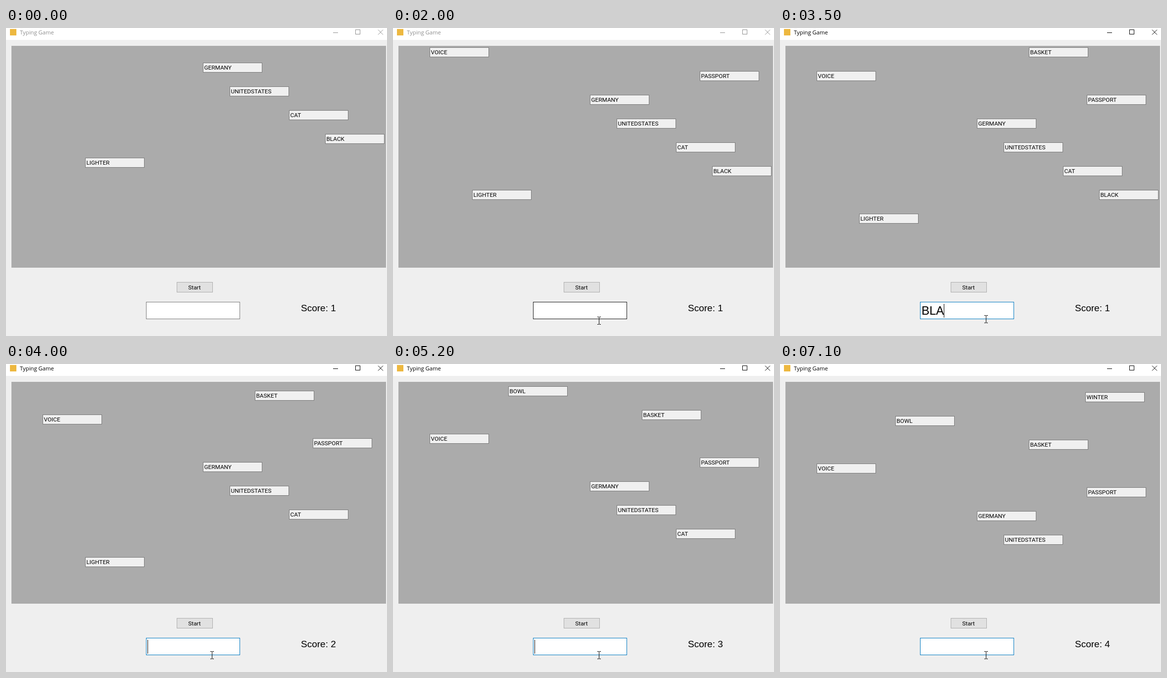
Recreate the animation shown at these times as an HTML page. Size 770 by 622 pixels, loop 7.2 s.

```html
<!DOCTYPE html>
<html lang="en">
<head>
<meta charset="utf-8">
<title>Typing Game</title>
<style>
  html, body { margin: 0; width: 100%; height: 100%; overflow: hidden; background: #efefef; }
  svg { display: block; }
  text { white-space: pre; fill: #000; }
  .label { font: 11.8px Roboto, sans-serif; }
  .title { font: 11.3px "Open Sans", sans-serif; }
  .score { font: 19px "Liberation Sans", Arial, sans-serif; }
  .typed { font: 24px "Liberation Sans", Arial, sans-serif; }
  .line { fill: none; shape-rendering: crispEdges; }
  #word rect { fill: #f0f0f0; stroke: #7a7a7a; }
</style>
</head>
<body>
<svg width="770" height="622" viewBox="0 0 770 622">
  <rect width="770" height="622" fill="#efefef"/>
  <rect width="770" height="24" fill="#fff"/>
  <rect x="8" y="2" width="13" height="13" fill="#edb83f"/>
  <text id="title" class="title" x="28" y="13">Typing Game</text>
  <g id="controls" fill="none">
    <path class="line" d="M661 9.5h10M706.5 3.5h9v9h-9z"/>
    <path d="M752 3.5l10 10M762 3.5l-10 10"/>
  </g>

  <clipPath id="clip"><rect x="11" y="36" width="757" height="448"/></clipPath>
  <rect x="11" y="36" width="757" height="448" fill="#ababab"/>
  <g id="words" clip-path="url(#clip)"></g>

  <rect x="345.5" y="513.5" width="72" height="20" fill="#e1e1e1" stroke="#adadad"/>
  <text class="label" x="381" y="528" text-anchor="middle">Start</text>
  <rect id="box" x="283.5" y="553.5" width="189" height="34" fill="#fff"/>
  <text id="typed" class="typed" x="286" y="579"></text>
  <rect id="caret" y="557" width="1" height="28"/>
  <text id="score" class="score" x="596" y="572"></text>
  <path id="cursor" class="line" stroke="#000" d="M-3 -7.5h3M1 -7.5h3M.5 -7v14M-3 7.5h3M1 7.5h3"/>
</svg>
<script>
const LOOP = 7200, TICK = 100, TOP = 36, GAP = 48, STEP = 3, FOCUS = 2300, BLINK = 530;
const $ = id => document.getElementById(id);

// Words from the lowest to the newest, each GAP above the one before.
const words = [
  ["LIGHTER", 160], ["BLACK", 645], ["CAT", 572], ["UNITEDSTATES", 452], ["GERMANY", 398],
  ["PASSPORT", 620], ["VOICE", 74], ["BASKET", 503], ["BOWL", 233], ["WINTER", 617]
];

// Typed words: first key, time per key, time of entry.
const entries = [
  { word: "BLACK", from: 3100, key: 140, done: 3900 },
  { word: "LIGHTER", from: 4200, key: 110, done: 5100 },
  { word: "CAT", from: 5900, key: 150, done: 6400 }
];

function make(tag, attrs, parent) {
  const el = document.createElementNS("http://www.w3.org/2000/svg", tag);
  for (const k in attrs) el.setAttribute(k, attrs[k]);
  return parent.appendChild(el);
}

const labels = words.map(([name, x], i) => {
  const g = make("g", {}, $("words"));
  make("rect", { x: .5, y: .5, width: 119, height: 19, fill: "#f0f0f0", stroke: "#7a7a7a" }, g);
  make("text", { x: 2.5, y: 14, class: "label" }, g).textContent = name;
  const entry = entries.find(e => e.word === name);
  return { g, x, y: 262 - i * GAP, end: entry ? entry.done : Infinity };
});

function show(el, on) {
  el.style.display = on ? "" : "none";
}

function drop(t) {
  return t < TICK ? 0 : 2 + STEP * Math.floor(t * .0106 + .2);
}

function drawInput(t) {
  let text = "", lastKey = FOCUS;
  for (const { word, from, key, done } of entries) {
    if (t < from) continue;
    const n = Math.min(word.length, Math.floor((t - from) / key) + 1);
    text = t < done ? word.slice(0, n) : "";
    lastKey = t < done ? from + (n - 1) * key : done;
  }
  $("typed").textContent = text;
  const width = text ? $("typed").getComputedTextLength() : 0;
  $("caret").setAttribute("x", 286 + Math.round(width));
  show($("caret"), t >= FOCUS && Math.floor((t - lastKey) / BLINK) % 2 === 0);
}

function draw(time) {
  const t = Math.floor((time % LOOP) / TICK) * TICK;
  const offset = drop(t);
  for (const { g, x, y, end } of labels) {
    show(g, y + offset >= TOP && t < end);
    g.setAttribute("transform", `translate(${x} ${y + offset})`);
  }

  const active = t >= FOCUS;
  $("title").style.fill = active ? "#000" : "#8f8f8f";
  $("controls").setAttribute("stroke", active ? "#000" : "#8f8f8f");
  $("box").setAttribute("stroke", active ? "#0078c0" : t >= 2000 ? "#171717" : "#7a7a7a");
  $("score").textContent = "Score: " + (1 + entries.filter(e => t >= e.done).length);
  drawInput(t);

  const cy = t < 2000 ? 591 + Math.round((2000 - t) * .1) : t < 2200 ? 591 : 588;
  show($("cursor"), t >= 1800);
  $("cursor").setAttribute("transform", `translate(416 ${cy})`);
}

const start = performance.now();
function frame() {
  draw(performance.now() - start);
  requestAnimationFrame(frame);
}
frame();
</script>
</body>
</html>
```
